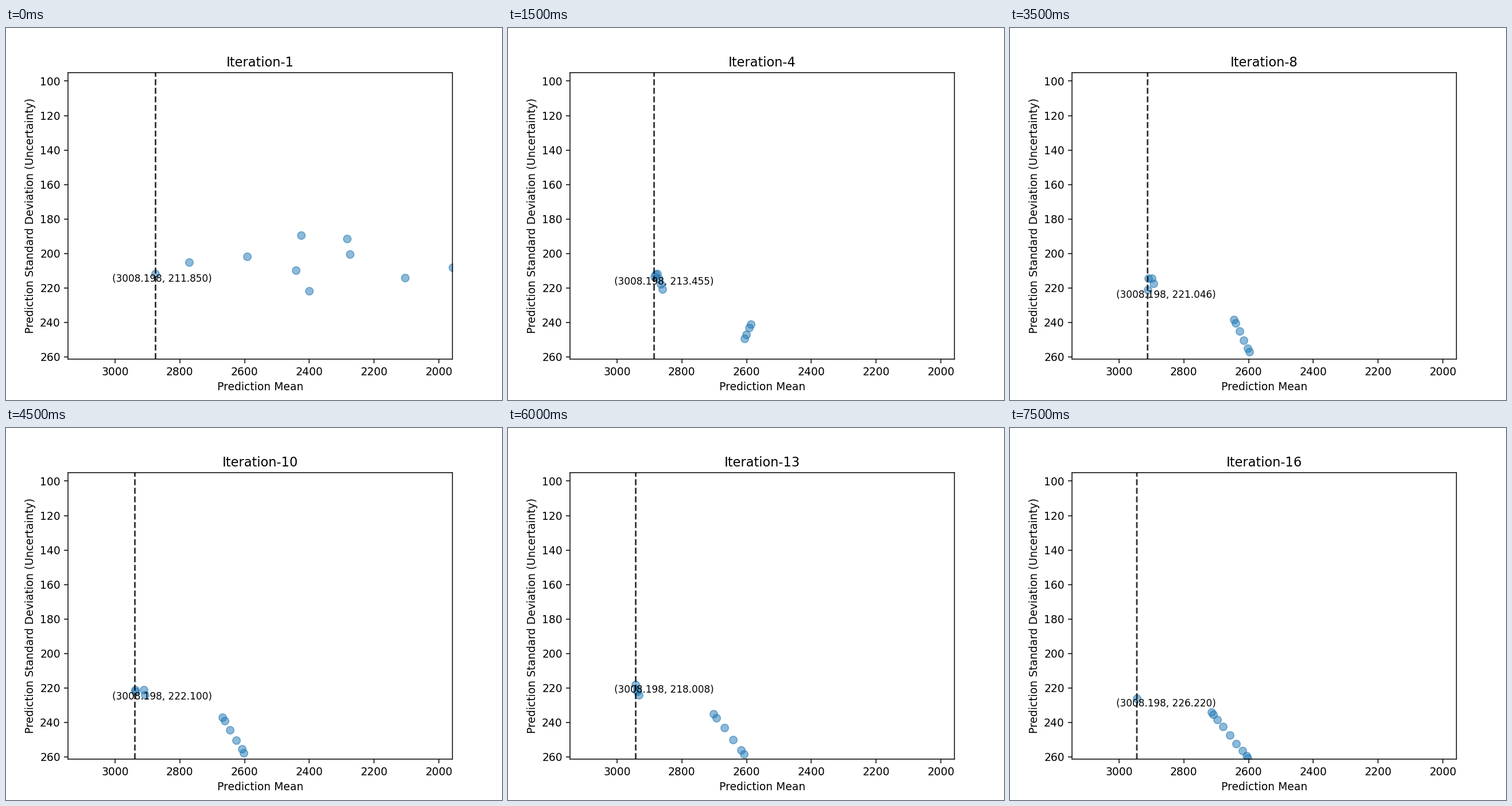
These frames come from a looping animation (864 px wide and 648 px high, 8000 ms). A matplotlib script:

```python
import matplotlib.pyplot as plt
import numpy as np
from matplotlib.animation import FuncAnimation

plt.rcParams["path.snap"] = False

STEPS, SIZE = 16, 10
TEXT_X = 3008.198

# Random starting population, best mean first
START = [(2771, 205.1), (2592, 201.8), (2442, 209.9), (2426, 189.6),
         (2401, 221.9), (2283, 191.6), (2275, 200.3), (2105, 214.1),
         (1957, 208.1)]

# Record holders: first step, mean, std
RECORDS = [(1, 2875.0, 211.850), (3, 2881.2, 211.932), (4, 2885.6, 213.455),
           (5, 2886.0, 215.600), (6, 2898.9, 214.418), (7, 2910.4, 214.382),
           (8, 2911.9, 221.046), (9, 2937.6, 221.098), (10, 2938.8, 222.100),
           (11, 2942.4, 218.008), (14, 2935.5, 226.216), (15, 2945.1, 226.220)]

# Second cluster: its size and its two ends at key steps
FRONT_STEP = [1, 4, 6, 8, 14, 16]
FRONT_SIZE = [0, 4, 4, 6, 7, 9]
HIGH_END = [2586, 2586, 2642, 2645, 2714, 2714], [241, 241, 244, 238.5, 234.2, 234.2]
LOW_END = [2607, 2607, 2607, 2598, 2610, 2602], [249.4, 249.4, 249.4, 257, 258.7, 260.6]


def at(step, values):
    return np.interp(step, FRONT_STEP, values)


def front(step):
    """Dots along a line, crowded towards both ends."""
    u = np.linspace(0, 1, int(at(step, FRONT_SIZE)))
    u = u * u * (3 - 2 * u)
    mean, std = (at(step, a) + u * (at(step, b) - at(step, a))
                 for a, b in zip(HIGH_END, LOW_END))
    return list(zip(mean, std))


def leaders(step, count):
    """The latest record holders, followed by a short slanted tail."""
    recent = [r[1:] for r in RECORDS if r[0] <= step][-min(count, 3):]
    mean, std = recent[0]
    tail = [(mean - 5 * k, std + 3 * k)
            for k in range(1, count - len(recent) + 1)]
    return recent[::-1] + tail


def population(step):
    first_gen = START[:max(0, 3 * (4 - step))]
    second = front(step)
    return leaders(step, SIZE - len(first_gen) - len(second)) + second + first_gen


fig, ax = plt.subplots(figsize=(6.4, 4.8), dpi=135)
ax.set_xlim(3145.4, 1958)
ax.set_ylim(261.3, 95.1)
ax.set_xlabel("Prediction Mean")
ax.set_ylabel("Prediction Standard Deviation (Uncertainty)")
title = ax.set_title("")
dots = ax.scatter([], [], s=50, color="C0", alpha=0.5)
line = ax.axvline(RECORDS[0][1], color="black", linestyle="--", alpha=0.8)
label = ax.text(TEXT_X, 0, "", fontsize=9, va="top")


def update(i):
    step = i + 1
    dots_now = population(step)
    mean, std = dots_now[0]
    title.set_text(f"Iteration-{step}")
    dots.set_offsets(dots_now)
    line.set_xdata([mean, mean])
    label.set_y(std)
    label.set_text(f"({TEXT_X:.3f}, {std:.3f})")
    return title, dots, line, label


anim = FuncAnimation(fig, update, frames=STEPS, interval=500,
                     repeat=True, repeat_delay=0)
plt.show()
```
